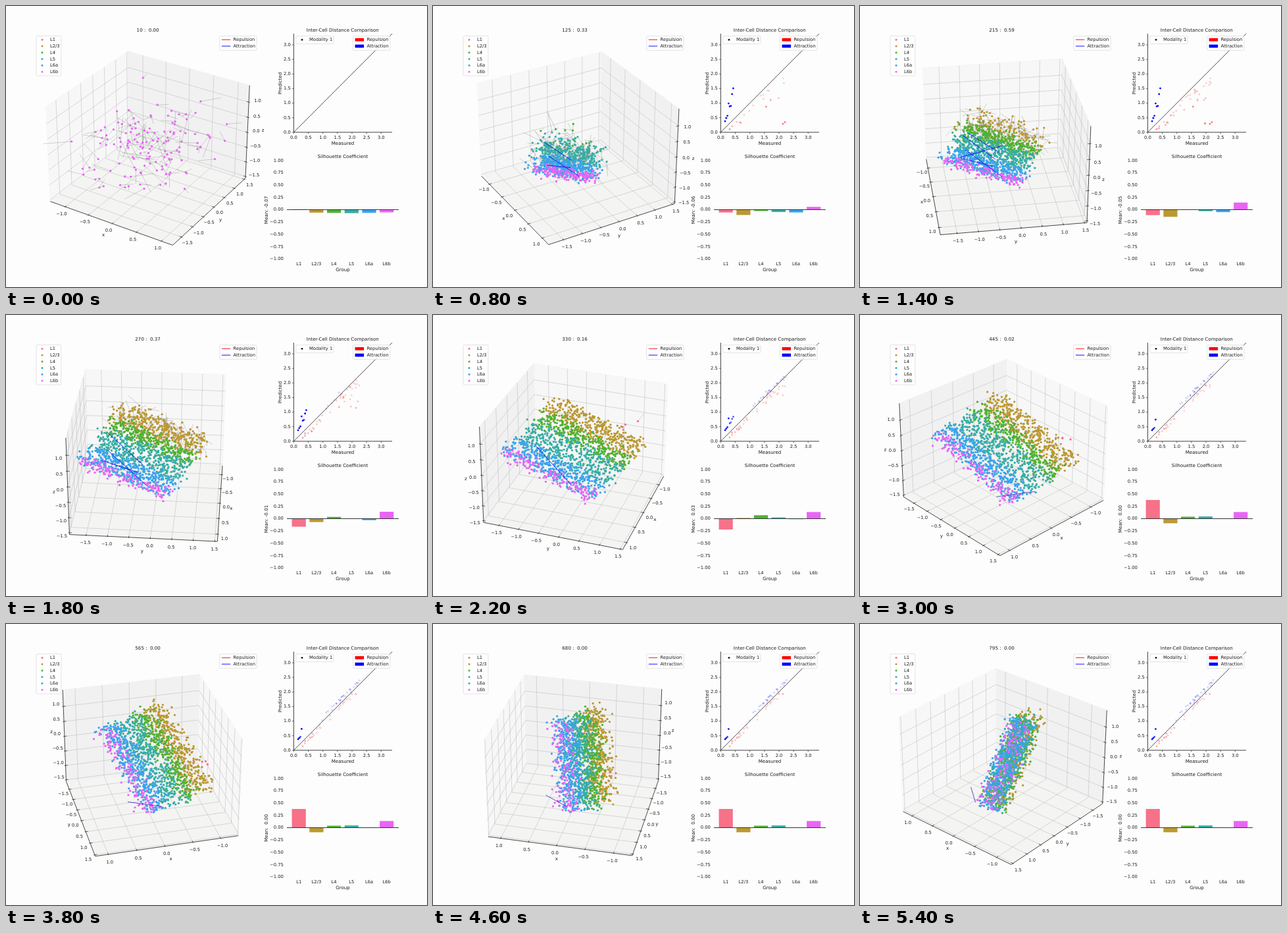
Animation of 640 by 427 pixels, one loop 5.6 s. Source, as an HTML page with a canvas:

```html
<!DOCTYPE html>
<html lang="en">
<head>
<meta charset="utf-8">
<style>
html, body { margin: 0; width: 100%; height: 100%; overflow: hidden; background: #fdfdfd; }
canvas { display: block; width: 640px; height: 427px; }
</style>
</head>
<body>
<canvas id="stage"></canvas>
<script>
const STEP = 200, STEPS = 28;
const FONT = '"DejaVu Sans", Verdana, sans-serif';
const SMALL = 6.75, LARGE = 7.1, INK = '#1c1c1c', RED = '#f00', BLUE = '#00f';
const canvas = document.getElementById('stage');
const ctx = canvas.getContext('2d');
const dpr = window.devicePixelRatio || 1;
canvas.width = Math.round(640 * dpr);
canvas.height = Math.round(427 * dpr);

// Random and easing helpers
let seed = 20;
function rnd() {
  seed = (seed + 0x6D2B79F5) | 0;
  let t = Math.imul(seed ^ (seed >>> 15), 1 | seed);
  t = (t + Math.imul(t ^ (t >>> 7), 61 | t)) ^ t;
  return ((t ^ (t >>> 14)) >>> 0) / 4294967296;
}
const span = (a, b) => a + (b - a) * rnd();
const gauss = s => (rnd() + rnd() + rnd() + rnd() - 2) * 1.73 * s;
const times = (n, make) => Array.from({ length: n }, (_, i) => make(i));
const clamp = (v, a, b) => Math.min(b, Math.max(a, v));
const decay = (age, tau) => Math.exp(-Math.max(0, age) / tau);

// The fit starts, peaks in error, improves and settles at even intervals
const START = 10, PEAK = 215, PHASE = 115;
function phased([first, peak, better, settled], iter) {
  const lerp = (a, b, u) => a + (b - a) * clamp(u, 0, 1);
  if (iter < PEAK) return lerp(first, peak, (iter - START) / (PEAK - START));
  if (iter < PEAK + PHASE) return lerp(peak, better, (iter - PEAK) / PHASE);
  return lerp(better, settled, (iter - PEAK) / PHASE - 1);
}
function errorAt(iter) {
  if (iter < PEAK) return .59 * (iter - START) / (PEAK - START);
  return .59 * Math.exp(-(((iter - PEAK) / 95) ** 1.37));
}

// Layers from the surface down: depth range, cell count, silhouette score by phase
const layers = [
  { name: 'L1', color: '#f77189', n: 4, top: 1.2, base: 1.12, score: [.01, -.11, -.22, .38] },
  { name: 'L2/3', color: '#bb9832', n: 400, top: 1.1, base: .77, score: [-.06, -.145, .015, -.093] },
  { name: 'L4', color: '#50b131', n: 320, top: .82, base: .57, score: [-.065, .005, .07, .04] },
  { name: 'L5', color: '#36ada4', n: 420, top: .62, base: .22, score: [-.07, -.03, .025, .045] },
  { name: 'L6a', color: '#3ba3ec', n: 400, top: .27, base: -.03, score: [-.065, -.05, -.01, -.006] },
  { name: 'L6b', color: '#e866f4', n: 140, top: .07, base: -.08, score: [-.055, .145, .135, .135] }
];

// The tissue is a slab: depth across layers, length along them, thin normal
const CENTER = [-.043, -.028, .01], DEPTH = [-.362, .293, .33];
const LENGTH = [-.2, .64, -.4], NORMAL = [-.769, -.495, -.405];
let growth = 1;
function place(g, l, t = 0) {
  const depth = g * growth - .5, along = l * (.6 + .4 * growth);
  return CENTER.map((c, i) => c + DEPTH[i] * depth + LENGTH[i] * along + NORMAL[i] * t);
}

// Deep cells come first from a loose cloud, the others near their place
layers.forEach((layer, i) => {
  const pull = i === 5 ? 1 : 0;
  const birth = [245, 185, 120, 60, 12, START][i];
  layer.cells = times(layer.n, () => ({
    g: span(layer.base, layer.top) + gauss(.035),
    l: i ? span(-.53, .53) + gauss(.03) : span(.2, .38),
    t: span(-.08, .08) + gauss(.03),
    off: pull ? [gauss(.24), gauss(.24), gauss(.14)] : times(3, () => gauss(.06)),
    whisker: times(3, () => gauss(.08)),
    birth: pull ? birth : birth + span(0, 75),
    pull
  }));
});

// 3D view
const SIZE = [1.143, 1.143, .857];
const LIMITS = [[-1.325, 1.225], [-1.89, 1.56], [-1.56, 1.54]];
let sinA, cosA;
function setView(iter) {
  const a = (-60 + .24 * iter) * Math.PI / 180;
  sinA = Math.sin(a);
  cosA = Math.cos(a);
  growth = 1 - .28 * decay(iter - PEAK, 55);
}
function project([x, y, z]) {
  const near = x * cosA + y * sinA;
  const scale = 1920 / (10 - near * .866 - z * .5);
  return [217.9 + (y * cosA - x * sinA) * scale, 209.3 - (z * .866 - near * .5) * scale];
}
const corner = (...s) => s.map((v, i) => v * SIZE[i] / 2);

// Drawing helpers
function path(points, stroke, width) {
  ctx.beginPath();
  points.forEach(p => ctx.lineTo(p[0], p[1]));
  ctx.strokeStyle = stroke;
  ctx.lineWidth = width;
  ctx.stroke();
}
function dot(x, y, r, fill) {
  ctx.fillStyle = fill;
  ctx.beginPath();
  ctx.arc(x, y, r, 0, 7);
  ctx.fill();
}
function rect(x, y, w, h, fill) {
  ctx.fillStyle = fill;
  ctx.fillRect(x, y, w, h);
}
function text(str, x, y, align = 'center', size = SMALL) {
  ctx.font = size + 'px ' + FONT;
  ctx.textAlign = align;
  ctx.fillStyle = INK;
  ctx.fillText(str, x, y);
}
function sideText(str, x, y) {
  ctx.save();
  ctx.translate(x, y);
  ctx.rotate(-Math.PI / 2);
  text(str, 0, 0, 'center', LARGE);
  ctx.restore();
}
function legendBox(x, y, w, h) {
  ctx.beginPath();
  ctx.roundRect(x, y, w, h, 1.3);
  ctx.fillStyle = 'rgba(255,255,255,.8)';
  ctx.fill();
  ctx.strokeStyle = '#d6d6d6';
  ctx.lineWidth = .65;
  ctx.stroke();
}
function forceLegend(x, y, drawKey) {
  legendBox(x, y, 56.3, 21.8);
  ['Repulsion', 'Attraction'].forEach((name, i) => {
    const row = y + 5.6 + i * 9.8;
    drawKey(row, i ? BLUE : RED);
    text(name, x + 20.8, row + .2, 'left');
  });
}
const num = (v, digits) => v.toFixed(digits).replace('-', '\u2212');
const signed = v => {
  const s = v.toFixed(2).replace('-0.00', '0.00');
  return s[0] === '-' ? s : ' ' + s;
};

function drawCube() {
  const sx = Math.sign(cosA), sy = Math.sign(sinA);
  const turn = [[-1, -1], [1, -1], [1, 1], [-1, 1]];
  const panes = [
    ['#f7f7f7', turn.map(([a, b]) => [-sx, a, b])],
    ['#f1f1f1', turn.map(([a, b]) => [a, -sy, b])],
    ['#f4f4f3', turn.map(([a, b]) => [a, b, -1])]
  ];
  for (const [fill, quad] of panes) {
    const pts = quad.map(q => project(corner(...q)));
    path([...pts, pts[0]], '#e6e6e6', .5);
    ctx.fillStyle = fill;
    ctx.fill();
  }
  const axes = [
    { name: 'x', edge: [0, sy, -1], back: [[0, -sy, -1], [0, -sy, 1]], tick: 1, min: -1, max: 1 },
    { name: 'y', edge: [sx, 0, -1], back: [[-sx, 0, -1], [-sx, 0, 1]], tick: 0, min: -1.5, max: 1.5 },
    { name: 'z', edge: [sx, -sy, 0], back: [[-sx, -sy, 0], [-sx, sy, 0]],
      tick: Math.abs(sinA) > Math.abs(cosA) ? 0 : 1, min: -1.5, max: 1 }
  ];
  axes.forEach((axis, i) => {
    axis.values = times((axis.max - axis.min) * 2 + 1, n => axis.min + n / 2);
    axis.at = (signs, v, grow = 1) => {
      const p = corner(...signs).map(c => c * grow), [lo, hi] = LIMITS[i];
      p[i] = ((v - lo) / (hi - lo) - .5) * SIZE[i];
      return p;
    };
    for (const v of axis.values)
      path([axis.edge, ...axis.back].map(s => project(axis.at(s, v))), '#bbb', .55);
  });
  axes.forEach((axis, i) => {
    const [lo, hi] = LIMITS[i];
    path([lo, hi].map(v => project(axis.at(axis.edge, v))), '#111', .75);
    for (const v of axis.values) {
      const ends = [.967, 1.017].map(f => {
        const p = axis.at(axis.edge, v);
        p[axis.tick] *= f;
        return project(p);
      });
      path(ends, '#111', .65);
      text(num(v, 1), ...project(axis.at(axis.edge, v, 1.09)));
    }
    const [x, y] = project(axis.at(axis.edge, (lo + hi) / 2, 1.16));
    text(axis.name, x, y - 1.2, 'center', LARGE);
  });
}

function drawCells(iter) {
  for (const layer of layers) {
    const points = [];
    for (const c of layer.cells) {
      if (iter < c.birth) continue;
      const rest = decay(iter - c.birth, 35);
      const pos = place(c.g, c.l, c.t).map((h, i) => h * (1 - c.pull * rest) + c.off[i] * rest);
      const from = project(pos);
      if (rest > .15)
        path([from, project(pos.map((p, i) => p + c.whisker[i] * rest))], 'rgba(110,110,110,.6)', .5);
      points.push(from);
    }
    points.forEach(p => dot(p[0], p[1], 1.65, layer.color));
  }
}

// Long links pull distant cells together and drop out as the error falls; one remains
const links = times(5, i => ({ from: [span(.1, .65), span(-.5, -.25)], to: [.15 * i, span(.05, .35)] }));
const LAST_LINK = [[.215, .15, -.25], [-.013, .348, -.21]];
function drawLinks(iter) {
  links.slice(0, Math.round(errorAt(iter) * 8))
    .forEach(k => path([project(place(...k.from)), project(place(...k.to))], '#0a0af0', .85));
  if (iter > PEAK + 2 * PHASE - 20) path(LAST_LINK.map(project), '#1a1ab8', .75);
}

// Distance comparison: pairs start off the diagonal and settle close to it
const pairs = times(64, i => ({
  m: i % 4 ? span(.8, 1.6) + span(0, .8) : span(.3, .9),
  dev: (i % 2 ? 1 : -1) * span(.02, .2),
  lag: i % 13 === 5 ? .85 : span(.05, .45)
}));
const closePairs = times(8, i => ({ m: .15 + .04 * i, gap: i === 3 ? .46 : .23, early: span(0, .14) * i, keep: i < 4 }));
const UNIT = 44.3, OX = 437.4, OY = 191.9;
function plotPair(m, p) {
  const ratio = Math.abs(p - m) / m;
  ctx.globalAlpha = clamp(.17 + .55 * ratio * ratio, 0, 1);
  dot(OX + m * UNIT, OY - p * UNIT, 1.4, p > m ? BLUE : RED);
  ctx.globalAlpha = 1;
}
function drawComparison(iter) {
  text('Inter-Cell Distance Comparison', 511.8, 37, 'center', LARGE);
  const early = decay(iter - PEAK, 75);
  const shown = clamp((iter - 20) / 300, 0, 1);
  pairs.slice(0, Math.floor(pairs.length * shown))
    .forEach(q => plotPair(q.m, (q.m + q.dev) * (1 - early * q.lag)));
  if (iter > 60)
    closePairs.filter(q => q.keep || early > .2)
      .forEach(q => plotPair(q.m, q.m + q.gap + early * q.early));
  path([[OX, OY], [587, 42.1]], '#222', .8);
  path([[OX, 42.1], [OX, OY], [587, OY]], '#111', .8);
  for (let v = 0; v < 3.3; v += .5) {
    const x = OX + v * UNIT, y = OY - v * UNIT;
    path([[x, OY], [x, OY + 2.4]], '#111', .6);
    path([[OX, y], [OX - 2.4, y]], '#111', .6);
    text(num(v, 1), x, 200);
    text(num(v, 1), 432.7, y, 'right');
  }
  text('Measured', 512, 209.2, 'center', LARGE);
  sideText('Predicted', 417.5, 117.5);
  legendBox(440.7, 45.6, 57.3, 11.8);
  dot(450, 51.3, 1.4, '#111');
  text('Modality 1', 461, 51.5, 'left');
  forceLegend(527.6, 45.6, (y, color) => rect(530.6, y - 2.4, 13.5, 4.8, color));
}

function drawSilhouette(iter) {
  const zero = 309.5, unit = 74.8;
  text('Silhouette Coefficient', 512, 229.3, 'center', LARGE);
  for (let v = -1; v <= 1; v += .25) text(num(v, 2), 421.8, zero - v * unit + .2, 'right');
  layers.forEach((layer, i) => {
    const x = 445.2 + i * 26.7, h = phased(layer.score, iter) * unit;
    rect(x - 10.6, zero - h, 21.2, h, layer.color);
    text(layer.name, x, 392.2);
  });
  path([[427, zero], [597, zero]], '#222', .9);
  text('Group', 512, 401.4, 'center', LARGE);
  sideText('Mean: ' + signed(phased([-.07, -.05, .03, 0], iter)), 395.8, 310);
}

function drawLegends() {
  legendBox(46, 45.5, 37.8, 60.5);
  layers.forEach((layer, i) => {
    const y = 51.3 + i * 9.75;
    dot(55, y, 1.5, layer.color);
    text(layer.name, 67, y + .2, 'left');
  });
  forceLegend(324.8, 45.6, (y, color) => path([[327.8, y], [341.2, y]], color, .95));
}

function draw(k) {
  const iter = START + 5 * Math.round(5.825 * k);
  ctx.setTransform(dpr, 0, 0, dpr, 0, 0);
  ctx.textBaseline = 'middle';
  ctx.textRendering = 'geometricPrecision';
  rect(0, 0, 640, 427, '#fdfdfd');
  setView(iter);
  drawCube();
  drawCells(iter);
  drawLinks(iter);
  drawLegends();
  text(iter + ' : ' + signed(errorAt(iter)), 215.6, 36.8, 'center', LARGE);
  drawComparison(iter);
  drawSilhouette(iter);
}

let last = -1;
const start = performance.now();
function tick() {
  const k = Math.floor((performance.now() - start) / STEP) % STEPS;
  if (k !== last) draw(last = k);
  requestAnimationFrame(tick);
}
tick();
</script>
</body>
</html>
```
